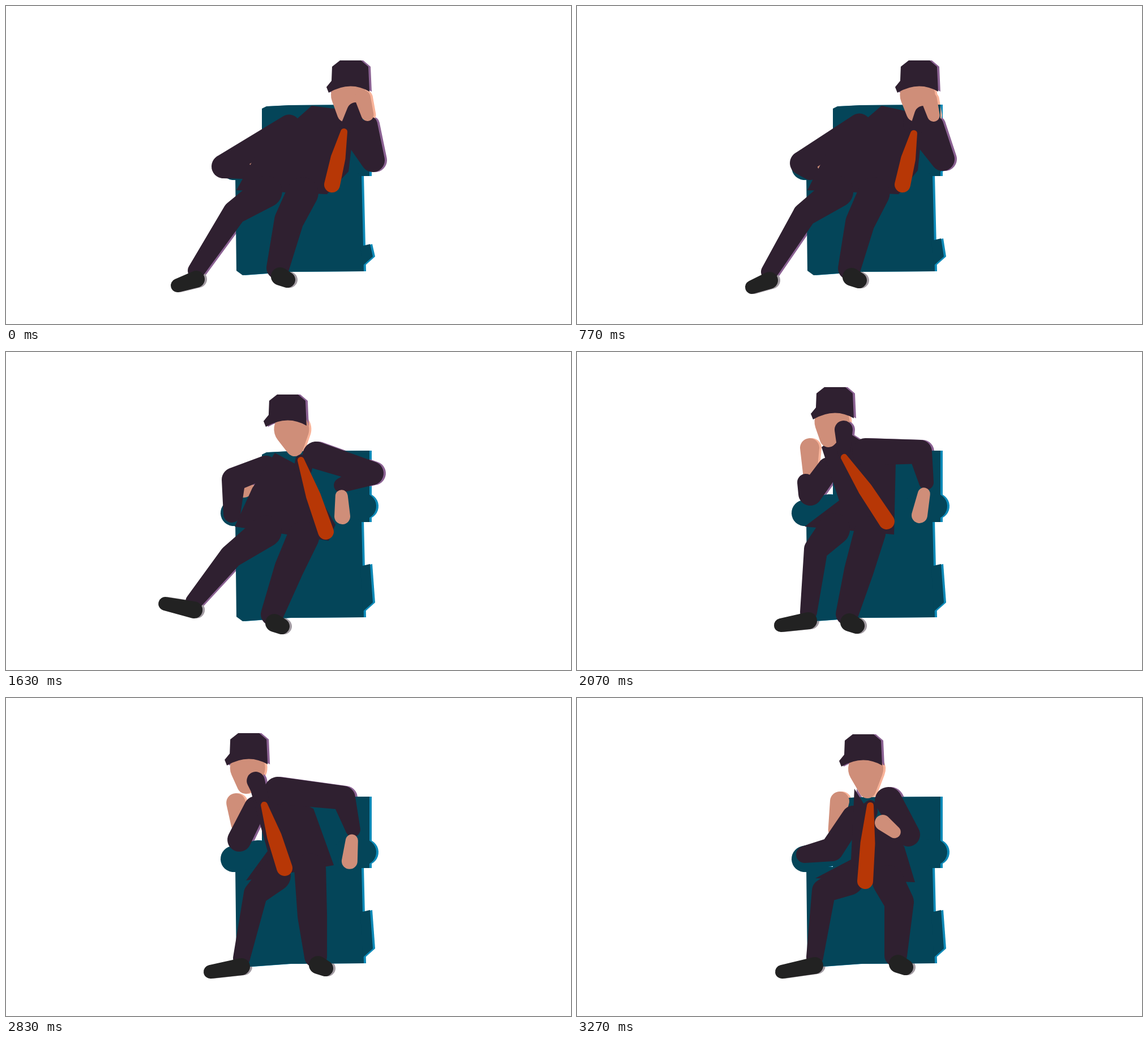
Animation of 998 by 561 pixels, one loop 3.31 s. Source, as an HTML page with a canvas:

```html
<!DOCTYPE html>
<html lang="en">
<head>
<meta charset="utf-8">
<title>Man in an armchair</title>
<style>
  html, body { margin: 0; width: 100%; height: 100%; overflow: hidden; background: #fff; }
  canvas { display: block; width: 100vw; height: 100vh; }
</style>
</head>
<body>
<canvas width="998" height="561"></canvas>
<script>
const ctx = document.querySelector('canvas').getContext('2d');
const LOOP = 3310;
const RIM_SHIFT = 4;
const KEY_TIMES = [0, 770, 1330, 1630, 2070, 2830, 3270];

// Each material: [fill, rim light]
const TEAL = ['#044559', '#0e8ab8'];
const SUIT = ['#2f2030', '#8b6293'];
const SKIN = ['#cf8e79', '#f9b49a'];
const TIE = ['#b73706', '#f05a1a'];
const SHOE = ['#222222', '#a39ca3'];

const HAT = 'M-42,48 L-33,37 -32,12 -18,1 19,1 32,12 34,56 Q0,36 -38,58Z';

// Joint positions at the key times; left and right are the viewer's.
const joints = {
  head:      '608,95 604,95 556,86 497,74 455,61 428,61 505,63',
  chin:      '600,190 597,189 553,182 510,169 444,153 423,154 513,162',
  nape:      '618,186 612,192 580,200 525,205 471,137 441,146 515,200',
  knot:      '597,222 595,225 565,208 521,191 472,186 456,189 518,190',
  tieTip:    '576,315 575,315 574,317 565,317 547,299 492,300 509,323',
  chestL:    '540,176 538,176 518,178 475,178 432,168 426,142 490,160',
  waistL:    '440,265 440,260 440,260 435,240 463,262 462,270 484,285',
  hipL:      '407,325 407,325 410,318 404,308 402,308 424,322 421,318',
  hipR:      '567,332 568,332 572,333 570,333 560,322 579,295 597,325',
  waistR:    '605,292 602,290 604,283 582,305 563,195 543,195 578,262',
  elbowL:    '384,283 397,277 404,268 402,225 412,250 412,250 450,267',
  wristL:    '420,290 412,292 408,289 399,286 404,230 412,242 402,276',
  fingersL:  '430,270 430,270 430,270 420,240 411,169 406,185 464,182',
  shoulderR: '605,205 600,207 595,205 548,182 510,176 480,163 550,181',
  elbowR:    '648,272 646,270 645,268 646,214 606,176 596,176 585,241',
  wristR:    '643,208 634,208 630,214 592,235 617,230 613,232 572,245',
  fingersR:  '630,162 622,165 592,175 594,290 605,288 607,288 540,220',
  kneeL:     '404,364 402,368 400,365 398,360 422,348 441,345 436,340',
  ankleL:    '336,467 340,469 334,456 332,440 409,459 416,459 420,457',
  toeL:      '303,493 309,496 298,471 281,444 360,482 361,483 362,483',
  kneeR:     '500,378 500,382 503,382 500,382 498,385 541,385 569,360',
  ankleR:    '480,462 481,463 484,463 470,463 477,462 547,456 563,454',
  footTop:   '632,420 632,410 632,400 632,374 632,374 632,374 632,374'
};
for (const name in joints)
  joints[name] = joints[name].split(' ').map(p => p.split(',').map(Number));

const lerp = (a, b, k) => a.map((v, i) => v + (b[i] - v) * k);
const shift = ([x, y], dx, dy) => [x + dx, y + dy];

function poseAt(t) {
  let i = 0;
  while (i < KEY_TIMES.length - 2 && t >= KEY_TIMES[i + 1]) i++;
  const k = Math.min(1, (t - KEY_TIMES[i]) / (KEY_TIMES[i + 1] - KEY_TIMES[i]));
  const pose = {};
  for (const name in joints) pose[name] = lerp(joints[name][i], joints[name][i + 1], k);
  return pose;
}

// Chain of tapered capsules through the points
function limb(points, radii) {
  const path = new Path2D();
  for (let i = 1; i < points.length; i++) {
    const [x1, y1] = points[i - 1], [x2, y2] = points[i];
    const r1 = radii[i - 1], r2 = radii[i];
    const dir = Math.atan2(y2 - y1, x2 - x1);
    const ratio = (r1 - r2) / (Math.hypot(x2 - x1, y2 - y1) || 1);
    const spread = Math.acos(Math.max(-1, Math.min(1, ratio)));
    const segment = new Path2D();
    segment.arc(x1, y1, r1, dir + spread, dir - spread + 2 * Math.PI);
    segment.arc(x2, y2, r2, dir - spread, dir + spread);
    segment.closePath();
    path.addPath(segment);
  }
  return path;
}

const polygon = points => new Path2D('M' + points.join(' L') + 'Z');

function hat([x, y]) {
  const path = new Path2D();
  path.addPath(new Path2D(HAT), new DOMMatrix([1, 0, 0, 1, x, y]));
  return path;
}

function shapes(p) {
  const forehead = [(p.head[0] + p.chin[0]) / 2 + 1, p.head[1] + 62];
  const heelL = shift(p.ankleL, 0, 15);
  const heelR = shift(p.ankleR, 4, 15);
  const leg = (side, knee, ankle, radii) => limb([lerp(p.hipL, p.hipR, side), knee, ankle], radii);
  return [
    [TEAL, polygon([[452, 181], [460, 177], [500, 175], [642, 174], [642, 300], [452, 300]])],
    [TEAL, polygon([[405, 298], [628, 298], [632, 468], [500, 469], [418, 475], [407, 467]])],
    [TEAL, limb([[402, 284], [445, 274]], [23, 23])],
    [TEAL, limb([[600, 274], [631, 272]], [23, 23])],
    [TEAL, polygon([shift(p.footTop, -6, 4), shift(p.footTop, 11, 0), [648, 442], [630, 458]])],
    [SKIN, limb([lerp(p.elbowL, p.fingersL, 0.4), p.fingersL], [12, 17])],
    [SUIT, limb([lerp(p.chestL, p.waistL, 0.4), p.elbowL, p.wristL], [20, 21, 15])],
    [SUIT, polygon([p.chestL, p.waistL, p.hipL, p.hipR, p.waistR, p.nape])],
    [SUIT, limb([p.shoulderR, p.elbowR, p.wristR], [24, 21, 13])],
    [SUIT, leg(0.33, p.kneeL, p.ankleL, [28, 21, 15])],
    [SUIT, leg(0.73, p.kneeR, p.ankleR, [28, 26, 20])],
    [SKIN, limb([forehead, p.chin], [31, 15])],
    [SUIT, hat(p.head)],
    [SUIT, limb([p.nape, p.knot], [16, 10])],
    [SKIN, limb([lerp(p.wristR, p.fingersR, 0.35), p.fingersR], [11, 14])],
    [TIE, limb([p.knot, lerp(p.knot, p.tieTip, 0.5), p.tieTip], [6, 13, 14])],
    [SHOE, limb([heelL, p.toeL], [15, 12])],
    [SHOE, limb([heelR, shift(heelR, 13, 6)], [16, 14])]
  ];
}

function paint(list, tone, dx) {
  ctx.setTransform(1, 0, 0, 1, dx, 0);
  for (const [material, path] of list) {
    ctx.fillStyle = material[tone];
    ctx.fill(path);
  }
}

const start = performance.now();
function tick() {
  const list = shapes(poseAt((performance.now() - start) % LOOP));
  ctx.setTransform(1, 0, 0, 1, 0, 0);
  ctx.clearRect(0, 0, 998, 561);
  paint(list, 1, RIM_SHIFT);
  paint(list, 0, 0);
  requestAnimationFrame(tick);
}
tick();
</script>
</body>
</html>
```
